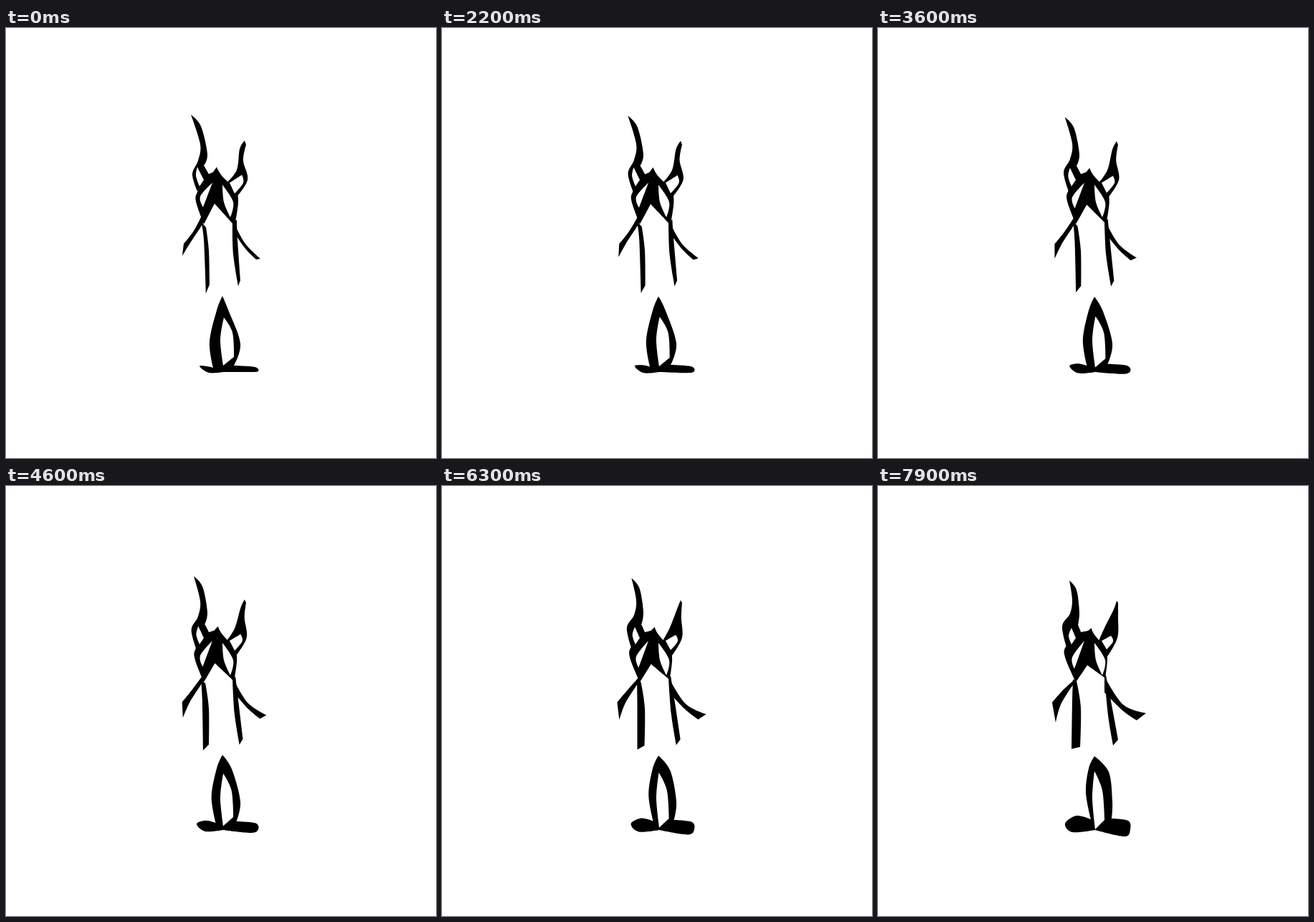
These frames come from a looping animation (600 by 600 pixels, 8 s). An HTML page:

```html
<!DOCTYPE html>
<html lang="en">
<head>
<meta charset="utf-8">
<title>Ink figure</title>
<style>
html, body { margin: 0; width: 100%; height: 100%; overflow: hidden; background: #fff; }
svg { display: block; width: 100vw; height: 100vh; }
</style>
</head>
<body>
<svg id="stage" viewBox="0 0 600 600"></svg>
<script>
const LOOP = 8000, STEP = 100;
const INK = '#000', PAPER = '#fff';
const svg = document.getElementById('stage');
const shapes = [];

// "x y" is a joint, ">dx dy" its travel over the loop, "~" marks a smooth joint.
function shape(fill, text) {
  const joints = text.split(',').map(item => {
    const [home, travel = '0 0'] = item.replace('~', '').split('>');
    return {
      smooth: item.includes('~'),
      home: home.trim().split(' ').map(Number),
      travel: travel.split(' ').map(Number)
    };
  });
  const path = document.createElementNS('http://www.w3.org/2000/svg', 'path');
  path.setAttribute('fill', fill);
  svg.append(path);
  shapes.push({ path, joints });
}

// Horns with ears
shape(INK, '258 121>9 11,~272 137>5 8,~281 176,276 192>3 2,283 204,277 213,267 228>-3 0,~260 204>-3 -8,~268 185>0 -7,~271 162>0 -4');
shape(INK, '333 157>0 3,335 163,~331 185>4 -2,~337 212>-3 0,320 238,308 216,~322 198>-6 0,~326 169>3 3');

// Head
shape(INK, '276 192>3 2,283 204,289 201>4 1,294 194>4 4,~301 206,~320 226>-4 0,~324 243>-4 -2,319 276>-2 -8,291 245>1 5,276 274,~265 242>-3 0,~267 229>-6 -3,277 212');

// Arms
shape(INK, '290 246>2 4,272 264>1 7,~262 283>-5 3,248 301>-5 1,246 318>2 12,~257 300>-2 5,271 279');
shape(INK, '319 274>-3 -8,~334 301>8 4,355 322>19 -5,349 323>12 4,~335 309>6 4,322 291>-6 -3');

// Sides of the body
shape(INK, '272 270,~276 295>-5 5,279 370>-9 -3,284 358>-2 6,~283 310,279 278>-2 -6');
shape(INK, '316 270>0 -4,~317 315>4 5,324 360>4 2,327 352>8 2,~323 295>2 5,322 268>-4 -4');

// Legs and feet
shape(INK, '302 374>0 3,~310 393>12 6,~327 440,318 471>8 -7,~347 473>2 -6,~352 479,~340 480>4 9,303 480,~283 481>-12 2,~270 472>-9 -1,~280 472>-3 -12,289 474>8 -9,~284 438>6 -10,~294 394');
shape(PAPER, '304 404>-2 -6,~316 425>-3 0,318 459>-2 7,303 471>0 8,~299 435');

// Ear gaps and lenses
shape(PAPER, '267 194>3 4,~265 206>1 3,270 221,276 212');
shape(PAPER, '329 205>-4 4,~331 216>-3 1,319 231>0 -3,312 216');
shape(PAPER, '288 216,~271 235>0 4,275 250>-1 5');
shape(PAPER, '302 219,~317 243,313 264,~304 243');

// Closed spline through the points; corners have no tangent.
function outline(joints, progress) {
  const count = joints.length;
  const points = joints.map(({ home, travel }) => home.map((v, axis) => v + travel[axis] * progress));
  const at = i => points[(i + count) % count];
  const handle = (i, sign) => joints[i % count].smooth
    ? at(i).map((v, axis) => v + sign * (at(i + 1)[axis] - at(i - 1)[axis]) / 6)
    : at(i);
  const curves = points.map((_, i) => `C${handle(i, 1)} ${handle(i + 1, -1)} ${at(i + 1)}`);
  return `M${at(0)}${curves.join('')}Z`;
}

function draw(time) {
  const progress = (time / (LOOP - STEP)) ** 1.5;
  for (const { path, joints } of shapes) path.setAttribute('d', outline(joints, progress));
}

const start = performance.now();
function tick() {
  const elapsed = (performance.now() - start) % LOOP;
  draw(Math.floor(elapsed / STEP) * STEP);
  requestAnimationFrame(tick);
}
tick();
</script>
</body>
</html>
```
